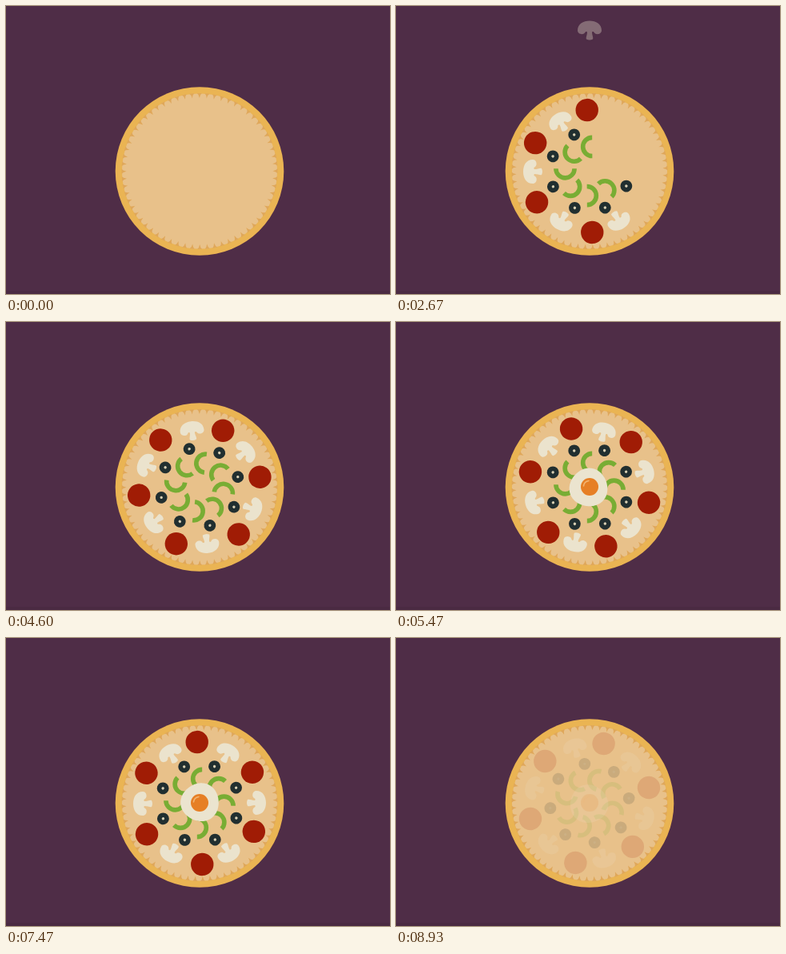
An HTML page with a canvas for the animation above (8990 ms loop, 480x360 px).

```html
<!DOCTYPE html>
<html lang="en">
<head>
<meta charset="utf-8">
<title>Pizza</title>
<style>
  html, body { margin: 0; width: 100%; height: 100%; overflow: hidden; background: #4f2d47; }
  canvas { display: block; }
</style>
</head>
<body>
<canvas id="stage" width="480" height="360"></canvas>
<script>
const ctx = document.getElementById('stage').getContext('2d');
const LOOP = 8990;
const CENTER = { x: 242, y: 206.5 };
const TURN = 360 / 3200;          // degrees per ms, counter-clockwise
const DROP = 119;                 // height of the fall in pixels
const TEETH = 64;
const rad = degrees => degrees * Math.PI / 180;
const clamp = v => Math.max(0, Math.min(1, v));

const mushroomShape = new Path2D(
  'M-15 0C-15-8-8-12 0-12S15-8 15 0C15 5 8 6 6 3C5 1 4 1 3 2' +
  'C3 6 5 9 4 11Q0 13-4 11C-5 9-3 6-3 2C-4 1-5 1-6 3C-8 6-15 5-15 0Z');

function disc(x, y, r, color) {
  ctx.fillStyle = color;
  ctx.beginPath();
  ctx.arc(x, y, r, 0, 2 * Math.PI);
  ctx.fill();
}

// Each shape is drawn where it lies at the top of the pizza, around its centre.
function sausage() {
  disc(0, -76.5, 14.2, '#a01c05');
}

function mushroom() {
  ctx.translate(0, -71);
  ctx.fillStyle = '#ebe3cd';
  ctx.fill(mushroomShape);
}

function olive() {
  disc(0, -49.5, 7.4, '#212f30');
  disc(0, -49.5, 1.7, '#d9d0b4');
}

function pepper() {
  ctx.strokeStyle = '#78ad34';
  ctx.lineWidth = 5.6;
  ctx.beginPath();
  ctx.arc(3.5, -30.5, 11.6, rad(90), rad(270));
  ctx.stroke();
}

const toppings = [];
function addRing(draw, count, firstLanding, fall, shifts = []) {
  for (let i = 0; i < count; i++) {
    const landing = firstLanding + (i * 360 / count + (shifts[i] || 0)) / TURN;
    toppings.push({ draw, landing, fall });
  }
}
addRing(pepper, 8, 667, 200);
addRing(olive, 8, 467, 200);
addRing(mushroom, 6, 800, 400);
addRing(sausage, 6, 1067, 400, [-2, 0, -2, -2, 0, 0]);

function drawBase(t) {
  disc(0, 0, 105.3, '#eab453');
  disc(0, 0, 97, '#e8c18a');
  ctx.save();
  ctx.rotate(rad(-t * TURN));
  ctx.fillStyle = '#dfa75a';
  for (let i = 0; i < TEETH; i++) {
    ctx.beginPath();
    ctx.moveTo(-3, -97.5);
    ctx.quadraticCurveTo(-0.8, -96, 0, -91.5);
    ctx.quadraticCurveTo(0.8, -96, 3, -97.5);
    ctx.fill();
    ctx.rotate(2 * Math.PI / TEETH);
  }
  ctx.restore();
}

function drawTopping({ draw, landing, fall }, t, fade) {
  const progress = clamp((t - landing + fall) / fall);
  if (!progress) return;
  ctx.save();
  ctx.globalAlpha = progress * fade;
  ctx.translate(0, -DROP * (1 - progress ** 2));
  ctx.rotate(rad(-Math.max(0, t - landing) * TURN));
  draw();
  ctx.restore();
}

function drawEgg(t, fade) {
  const grow = 1 - (1 - clamp((t - 4800) / 400)) ** 3;
  if (!grow) return;
  ctx.save();
  ctx.globalAlpha = grow * fade;
  ctx.scale(grow, grow);
  ctx.save();
  ctx.rotate(rad(-64 - (t - 1067) * TURN));
  ctx.fillStyle = '#ebe4cf';
  ctx.beginPath();
  for (let a = 0; a < 360; a += 3) {
    const r = 23.8 + 0.6 * Math.cos(rad(3 * a));
    ctx.lineTo(1.3 + r * Math.cos(rad(a)), r * Math.sin(rad(a)));
  }
  ctx.fill();
  ctx.restore();
  disc(0, -0.5, 11, '#e67f25');
  ctx.strokeStyle = '#f3b673';
  ctx.lineWidth = 1.6;
  ctx.lineCap = 'round';
  ctx.beginPath();
  ctx.arc(0, -0.5, 7.6, rad(188), rad(262));
  ctx.stroke();
  ctx.restore();
}

function render(t) {
  ctx.fillStyle = '#4f2d47';
  ctx.fillRect(0, 0, 480, 360);
  ctx.fillStyle = '#4a2a42';
  ctx.fillRect(0, 356, 480, 4);
  const fade = 1 - clamp((t - 8533) / 467);
  ctx.save();
  ctx.translate(CENTER.x, CENTER.y);
  drawBase(t);
  for (const topping of toppings) drawTopping(topping, t, fade);
  drawEgg(t, fade);
  ctx.restore();
}

const start = performance.now();
function tick() {
  render((performance.now() - start) % LOOP);
  requestAnimationFrame(tick);
}
tick();
</script>
</body>
</html>
```
